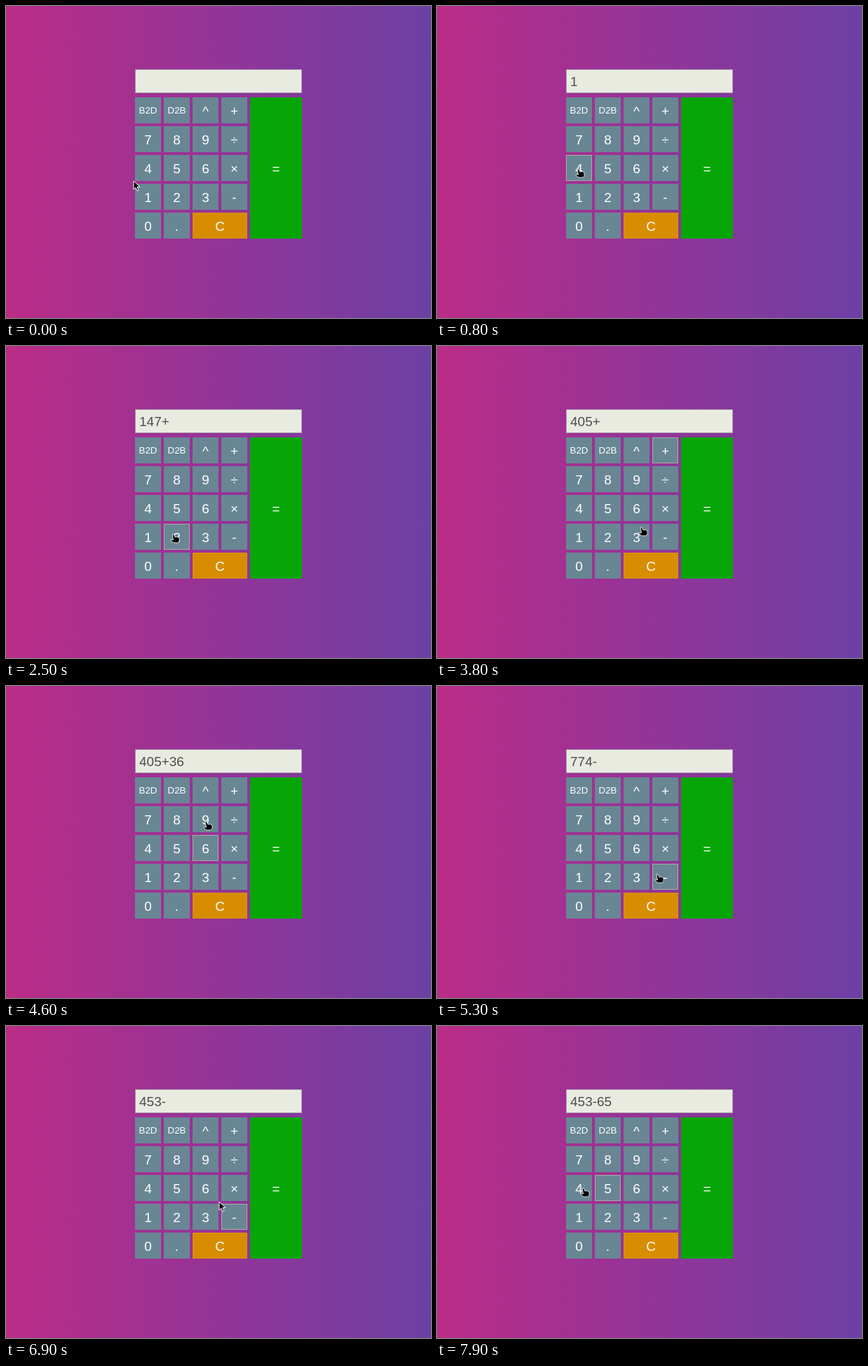
Animation, 606 px wide and 444 px high, one loop 8000 ms. Source, as an HTML page:

```html
<!DOCTYPE html>
<html lang="en">
<head>
<meta charset="utf-8">
<title>Calculator</title>
<style>
  html, body { margin: 0; width: 100%; height: 100%; overflow: hidden; }
  svg { display: block; width: 606px; height: 444px; }
  text { font-family: "Liberation Sans", Arial, sans-serif; font-size: 19px; }
  #keys text { fill: #fff; text-anchor: middle; }
</style>
</head>
<body>
<svg viewBox="0 0 606 444">
  <defs>
    <linearGradient id="bg">
      <stop offset="0" stop-color="#bb2c87"/>
      <stop offset=".5" stop-color="#943498"/>
      <stop offset="1" stop-color="#6c40a4"/>
    </linearGradient>
  </defs>
  <rect width="606" height="444" fill="url(#bg)"/>
  <rect x="184" y="90" width="238" height="34" fill="#a79bad"/>
  <rect x="185" y="91" width="236" height="32" fill="#e9ebe1"/>
  <text id="display" x="190" y="113.5" fill="#4d4d4d"></text>
  <g id="keys"></g>
  <rect id="focus" width="36" height="36" fill="none" stroke="#a9aea0"/>
  <g id="cursor" stroke="#fff" stroke-linejoin="round">
    <path id="arrow" d="M0 0V12L3 9.5L5 14L7 13L5 8.5H9Z"/>
    <path id="hand" d="M0 0L2 0L4 4L7 3.5L10 5L10 10L8 12H2L-2 9L-1.5 7.5L1.5 8Z" stroke-width=".8"/>
  </g>
</svg>
<script>
const $ = id => document.getElementById(id);
const LOOP = 8000, FRAME = 100, TYPE_DELAY = 100;
const keys = {};

function addKey(label, x, y, w = 37, h = 37, color = '#698694') {
  keys[label] = { x, y, w, h };
  const small = label.length > 1;
  $('keys').insertAdjacentHTML('beforeend',
    `<rect x="${x}" y="${y}" width="${w}" height="${h}" fill="${color}"/>
     <text x="${x + w / 2}" y="${y + h / 2 + (small ? 4.5 : 7)}"
       ${small ? 'style="font-size:13.33px"' : ''}>${label}</text>`);
}

['B2D D2B ^ +', '7 8 9 ÷', '4 5 6 ×', '1 2 3 -', '0 .'].forEach((row, r) =>
  row.split(' ').forEach((label, c) => addKey(label, 184 + 41 * c, 130 + 41 * r)));
addKey('C', 266, 294, 78, 37, '#d88d00');
addKey('=', 348, 130, 74, 201, '#06a606');

// time, pointer x, pointer y, key pressed there
const path = [
  [0, 182, 249],
  [400, 200, 268, '1'], [800, 200, 232, '4'], [1200, 202, 192, '7'],
  [1700, 324, 157], [1800, 325, 155, '+'],
  [2500, 237, 268, '2'], [2800, 240, 232, '5'], [3100, 241, 194, '8'],
  [3500, 322, 157, '+'], [3800, 290, 258],
  [3900, 285, 267, '3'], [4250, 285, 230, '6'],
  [4600, 284, 193], [4700, 284, 191, '9'], [5200, 322, 268, '-'],
  [5500, 286, 269, '3'], [5800, 238, 269, '2'], [6000, 225, 269],
  [6200, 203, 268, '1'], [6700, 322, 268, '-'],
  [7100, 286, 231, '6'], [7500, 240, 231, '5'],
  [7900, 207, 231], [LOOP, 205, 230]
];

// An operator first works out the sum already on the display.
function type(text, key) {
  const sum = text.match(/^(\d+)([+-])(\d+)$/);
  if (!sum || /\d/.test(key)) return text + key;
  const [, a, op, b] = sum;
  return (op === '+' ? +a + +b : a - b) + key;
}

function pointerAt(t) {
  const i = path.findIndex(p => p[0] > t);
  const [t0, x0, y0] = path[i - 1], [t1, x1, y1] = path[i];
  const u = (t - t0) / (t1 - t0), e = u * u * (3 - 2 * u);
  return [x0 + (x1 - x0) * e, y0 + (y1 - y0) * e];
}

function draw(t) {
  const presses = path.filter(p => p[3] && p[0] <= t);
  $('display').textContent = presses
    .filter(p => p[0] + TYPE_DELAY <= t)
    .reduce((text, p) => type(text, p[3]), '');

  const last = presses.at(-1);
  $('focus').style.display = last ? '' : 'none';
  if (last) {
    const { x, y } = keys[last[3]];
    $('focus').setAttribute('x', x + .5);
    $('focus').setAttribute('y', y + .5);
  }

  const [x, y] = pointerAt(t);
  const over = Object.values(keys).some(k =>
    x >= k.x && x < k.x + k.w && y >= k.y && y < k.y + k.h);
  $('cursor').setAttribute('transform', `translate(${Math.round(x)} ${Math.round(y)})`);
  $('hand').style.display = over ? '' : 'none';
  $('arrow').style.display = over ? 'none' : '';
}

const start = performance.now();
function tick() {
  const t = (performance.now() - start) % LOOP;
  draw(Math.floor(t / FRAME) * FRAME);
  requestAnimationFrame(tick);
}
tick();
</script>
</body>
</html>
```
